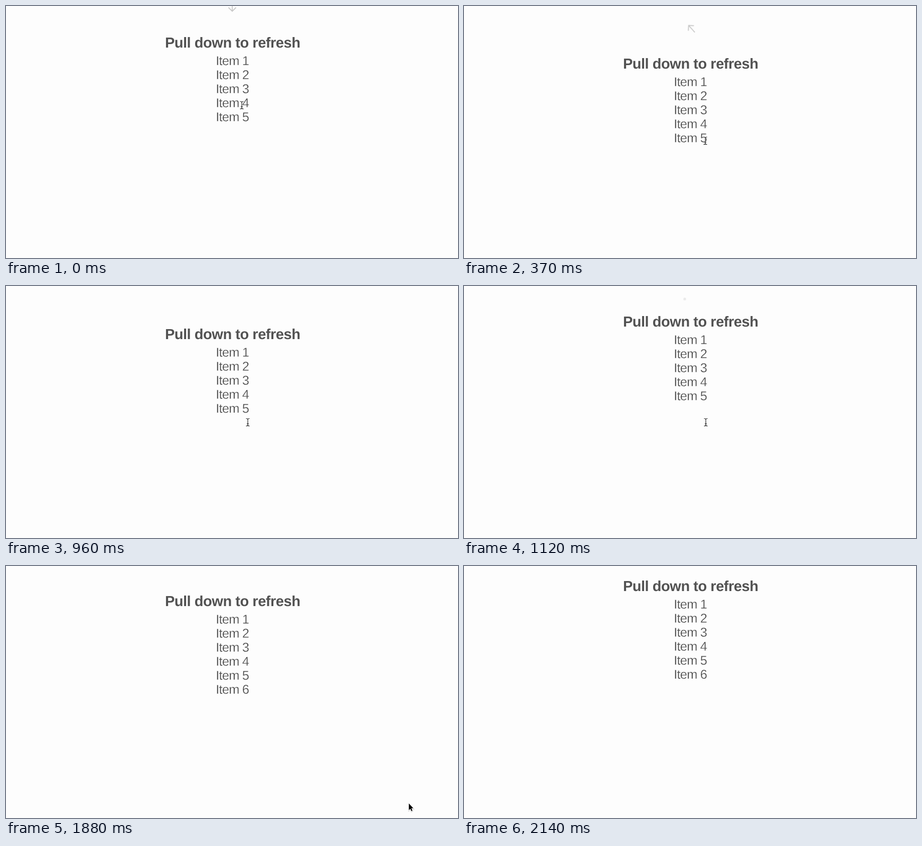
Recreate the animation shown at these times as an HTML page. Size 901x503 px, loop 3.01 s.

```html
<!DOCTYPE html>
<html lang="en">
<head>
<meta charset="utf-8">
<title>Pull down to refresh</title>
<style>
  :root { --t: 0; --bg: #fdfdfd; }
  html, body { margin: 0; width: 100%; height: 100%; overflow: hidden; background: var(--bg); }
  svg { display: block; width: 901px; height: 503px; }

  /* Every animation is paused and placed in time by --t (ms). */
  .anim {
    animation: 3010ms linear both paused;
    animation-delay: calc(var(--t) * -1ms);
  }
  .step { animation-timing-function: step-end; }

  text { font-family: "Liberation Sans", Arial, sans-serif; text-rendering: geometricPrecision; }
  .title { fill: #525252; font-size: 29px; font-weight: bold; letter-spacing: -.46px; }
  /* A background-coloured outline thins the letters to a light weight. */
  .item { fill: #484848; font-size: 25.5px; letter-spacing: -.8px; stroke: var(--bg); stroke-width: .35px; }

  .list { animation-name: pull; }
  .icon { animation-name: icon; }
  .turn { animation-name: turn; fill: none; stroke: #c9c9c9; stroke-width: 1.8; }
  .added { animation-name: added; }
  .cursor { animation-name: travel; }
  .beam { animation-name: beam; }
  .pointer { animation-name: pointer; }
  .dots { animation-name: dots; }
  .dot {
    fill: #aaa;
    opacity: 0;
    animation: pulse 600ms ease-in-out infinite paused;
    animation-delay: calc((var(--start) - var(--t)) * 1ms);
  }

  @keyframes pull {
    0% { transform: translateY(33px); animation-timing-function: ease-out; }
    7.64% { transform: translateY(70px); animation-timing-function: ease-out; }
    12.29% { transform: translateY(75px); }
    19.93%, 29.24% { transform: translateY(76px); animation-timing-function: ease; }
    39.2%, 64.12% { transform: translateY(30px); animation-timing-function: ease; }
    71.09%, 100% { transform: none; }
  }
  @keyframes turn {
    0%, 7.64% { transform: rotate(0deg); animation-timing-function: ease; }
    17.61%, 100% { transform: rotate(180deg); }
  }
  @keyframes travel {
    0% { transform: translate(470px, 198px); animation-timing-function: ease-out; }
    7.64% { transform: translate(478px, 260.5px); animation-timing-function: ease-out; }
    12.29% { transform: translate(481px, 269px); }
    19.93% { transform: translate(481.5px, 271px); }
    31.89%, 37.21% { transform: translate(482px, 272px); }
    43.19% { transform: translate(600px, 312px); }
    46.84% { transform: translate(693px, 354px); }
    54.82% { transform: translate(725px, 382px); }
    56.81% { transform: translate(729px, 386px); }
    62.46% { transform: translate(803px, 474px); }
    65.45% { transform: translate(824px, 498px); }
    67.44%, 100% { transform: translate(835px, 520px); }
  }
  @keyframes pulse {
    0%, 100% { transform: scale(.4); opacity: 0; }
    50% { transform: scale(1); opacity: 1; }
  }
  @keyframes icon { 0% { opacity: 1; } 29.2%, 100% { opacity: 0; } }
  @keyframes added { 0% { opacity: 0; } 41.1%, 100% { opacity: 1; } }
  @keyframes beam { 0% { opacity: 1; } 41.1%, 100% { opacity: 0; } }
  @keyframes pointer { 0% { opacity: 0; } 41.1% { opacity: 1; } 67.4%, 100% { opacity: 0; } }
  @keyframes dots { 0% { opacity: 0; } 33.8% { opacity: 1; } 61.5%, 100% { opacity: 0; } }
</style>
</head>
<body>
<svg viewBox="0 0 901 503">
  <g class="anim list">
    <g class="anim step icon">
      <g transform="translate(452 -30)">
        <path class="anim turn" d="M-1-11V7.5M-8.5 0L-1 7.5L6.5 0"/>
      </g>
    </g>
    <text class="title" x="316.9" y="50">Pull down to refresh</text>
    <g class="item">
      <text x="418.2" y="85.3">Item 1</text>
      <text x="418.2" y="113.3">Item 2</text>
      <text x="418.2" y="141.3">Item 3</text>
      <text x="418.2" y="169.3">Item 4</text>
      <text x="418.2" y="197.3">Item 5</text>
      <text class="anim step added" x="418.2" y="225.3">Item 6</text>
    </g>
  </g>

  <g class="anim step dots">
    <g transform="translate(440 26)"><circle class="dot" style="--start: 1020" r="5"/></g>
    <g transform="translate(453 26)"><circle class="dot" style="--start: 1130" r="5"/></g>
    <g transform="translate(466 26)"><circle class="dot" style="--start: 1240" r="5"/></g>
  </g>

  <defs>
    <path id="ibeam" d="M-3.5-7.5Q-.5-7.5 0-6Q.5-7.5 3.5-7.5M0-6V6M-3.5 7.5Q-.5 7.5 0 6Q.5 7.5 3.5 7.5M-2 3H2"/>
    <path id="tip" d="M0 0V13.2L3 10.4L5.1 15.2L7.2 14.3L5.1 9.6H9Z"/>
  </defs>
  <g class="anim cursor">
    <g class="anim step beam" fill="none">
      <use href="#ibeam" stroke="#fff" stroke-width="2.4" opacity=".8"/>
      <use href="#ibeam" stroke="#111" stroke-width="1.1"/>
    </g>
    <g class="anim step pointer">
      <use href="#tip" y="1" fill="none" stroke="#000" stroke-width="2.4" opacity=".15"/>
      <use href="#tip" stroke="#fff" stroke-width="1.6"/>
      <use href="#tip" fill="#000"/>
    </g>
  </g>
</svg>
<script>
  const LOOP = 3010;
  // Moments at which the picture is refreshed.
  const ticks = [
    0, 50, 110, 170, 230, 300, 370, 420, 480, 540,
    600, 660, 735, 810, 885, 960, 1010, 1060, 1120,
    1180, 1240, 1290, 1350, 1410, 1470, 1530, 1590, 1650,
    1710, 1770, 1820, 1880, 1970, 2030, 2080, 2140
  ];
  const root = document.documentElement;
  const start = performance.now();

  function draw() {
    const t = (performance.now() - start) % LOOP;
    root.style.setProperty('--t', ticks.findLast(tick => tick <= t));
    requestAnimationFrame(draw);
  }
  draw();
</script>
</body>
</html>
```
